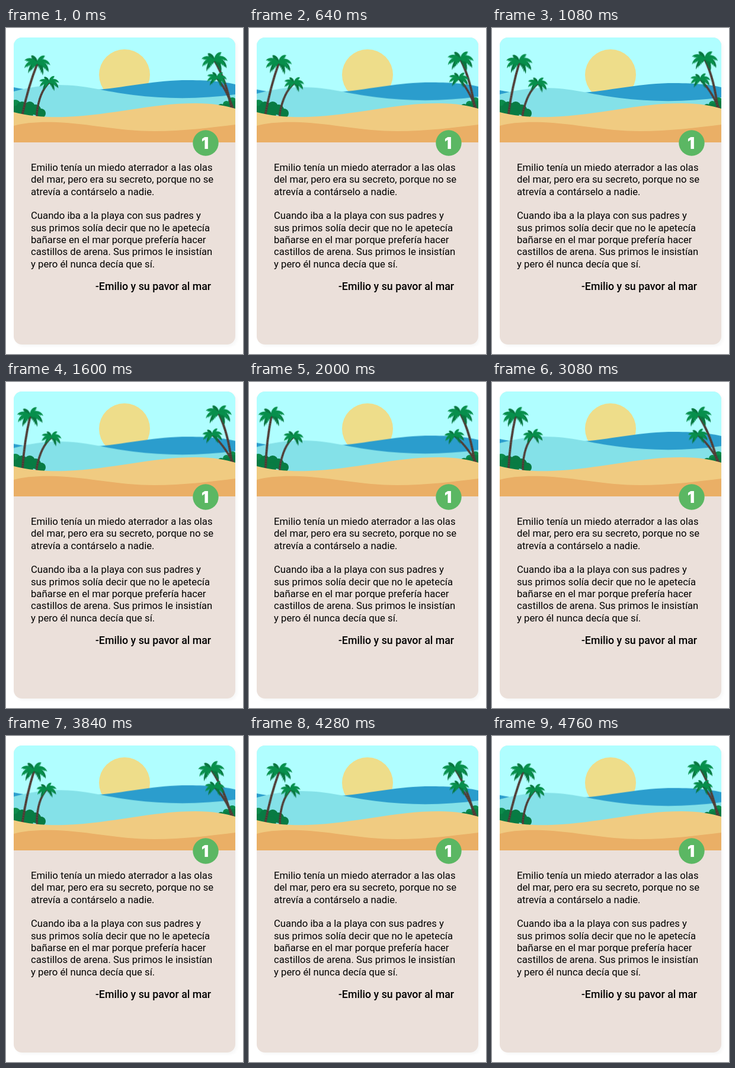
Animation, 400 px wide and 550 px high, one loop 4.8 s. Source, as an HTML page:

```html
<!DOCTYPE html>
<html lang="es">
<head>
<meta charset="utf-8">
<title>Cuento de playa</title>
<style>
  html, body { margin: 0; width: 100%; height: 100%; overflow: hidden; background: #fff; }
  svg { display: block; width: 400px; height: 550px; }
  text { font-family: Roboto, sans-serif; fill: #000; }
  .story { font-size: 16.7px; }
  .sign { font-size: 17.8px; font-weight: 500; }
  .num { font: 900 27.5px Inter, sans-serif; fill: #fff; text-anchor: middle; }
  .card { filter: drop-shadow(3px 3px 2px rgba(0, 0, 0, .03)); }
  .sway, .swell { animation: sway 2400ms cubic-bezier(.37, 0, .63, 1) infinite alternate; }
  .swell { animation-name: swell; animation-delay: -3600ms; }
  @keyframes sway { from { transform: rotate(var(--a)); } to { transform: rotate(calc(-1 * var(--a))); } }
  @keyframes swell { from { transform: translateY(5px); } to { transform: translateY(-5px); } }
</style>
</head>
<body>
<svg viewBox="0 0 400 550">
  <defs>
    <clipPath id="top"><path d="M13 193V30a14 14 0 0 1 14-14H373a14 14 0 0 1 14 14V193Z"/></clipPath>
  </defs>
  <rect class="card" x="13" y="16" width="374" height="518" rx="14" fill="#ebe0da"/>
  <g clip-path="url(#top)">
    <path fill="#b0feff" d="M13 16H387V193H13Z"/>
    <circle cx="200" cy="79" r="43" fill="#eedd8a"/>
    <g class="swell">
      <path fill="#2b9dcd" d="M13 100C55 109 105 109 155 104C210 99 250 88 308 88C345 88 370 91 387 95V170H13Z"/>
      <path fill="#84e1e8" d="M13 107C40 100 62 96 88 96C135 96 165 107 215 113C270 120 330 120 387 112V180H13Z"/>
    </g>
    <g id="palms"></g>
    <path fill="#f0cb81" d="M13 142C40 149 70 151 100 150C180 147 245 127 320 127C350 127 370 131 387 136V193H13Z"/>
    <path fill="#eaaf66" d="M13 165C30 160 55 158 85 159C140 161 190 174 250 174C300 174 345 168 387 163V193H13Z"/>
  </g>
  <circle cx="337" cy="194" r="21.7" fill="#5bb763"/>
  <text class="num" x="336" y="204">1</text>
  <g id="story"></g>
  <text class="sign" x="151" y="442">-Emilio y su pavor al mar</text>
</svg>
<script>
const lines = [
  'Emilio tenía un miedo aterrador a las olas',
  'del mar, pero era su secreto, porque no se',
  'atrevía a contárselo a nadie.',
  '',
  'Cuando iba a la playa con sus padres y',
  'sus primos solía decir que no le apetecía',
  'bañarse en el mar porque prefería hacer',
  'castillos de arena. Sus primos le insistían',
  'y pero él nunca decía que sí.'
];
story.innerHTML = lines.map((s, i) =>
  `<text class="story" x="42" y="${240.8 + i * 20.36}">${s}</text>`).join('');

// Leaf along a bent spine, with teeth on the lower edge
function frond(cx, cy, tx, ty, fill) {
  const n = 7, up = [], down = [];
  const at = t => [2 * t * (1 - t) * cx + t * t * tx, 2 * t * (1 - t) * cy + t * t * ty];
  const side = (t, w) => {
    const [x, y] = at(t);
    const dx = (1 - 2 * t) * cx + t * tx, dy = (1 - 2 * t) * cy + t * ty;
    const l = Math.hypot(dx, dy) || 1;
    return [x - dy / l * w, y + dx / l * w].map(v => v.toFixed(1)).join(' ');
  };
  const dir = Math.sign(tx) || 1;
  for (let i = 1; i < n; i++) {
    const t = i / n, w = 1.5 + 4 * Math.sin(Math.PI * t ** .8);
    up.push(side(t, -dir * w * .5));
    down.unshift(side(t - .05, dir * w * .5), side(t + .06, dir * w));
  }
  return `<path fill="${fill}" d="M0 0L${up.join('L')}L${tx} ${ty}L${down.join('L')}Z"/>`;
}

const dark = '#08763f', green = '#078f4c';
const crown = [
  [-9, -2, -14, 18, dark], [8, -1, 11, 19, dark], [15, -4, 20, 13, dark],
  [-6, -11, -12, -12, dark], [4, -12, 12, -14, green],
  [-13, -9, -22, -3, green], [-14, -5, -21, 10, green],
  [12, -11, 22, 1, green], [9, -7, 18, 11, green], [-5, -6, -9, 12, green]
].map(a => frond(...a)).join('');

function palm({ base: [bx, by], bend, head: [hx, hy], size, sway, delay }) {
  const d = `M${bx} ${by + 10}L${bx} ${by}Q${bend} ${hx} ${hy}`;
  return `<g class="sway" style="--a:${sway}deg;transform-origin:${bx}px ${by}px;animation-delay:${delay}ms">
    <path d="${d}" fill="none" stroke="#4c3b35" stroke-width="${2.8 + size}"/>
    <path d="${d}" fill="none" stroke="#604a42" stroke-width="${1.6 + size}" stroke-dasharray="1 3"/>
    <g transform="translate(${hx} ${hy}) scale(${size})">${crown}</g></g>`;
}

const bush = (fill, ...dots) =>
  dots.map(([x, y, r]) => `<circle cx="${x}" cy="${y}" r="${r}" fill="${fill}"/>`).join('');

palms.innerHTML =
  bush('#0a8a4a', [16, 130, 9], [382, 124, 7], [372, 129, 6]) +
  bush('#087b43', [27, 133, 9], [40, 133, 9], [50, 138, 9], [59, 144, 8], [18, 144, 13], [36, 145, 10],
    [384, 132, 9], [373, 135, 8], [363, 134, 6]) +
  palm({ base: [28, 144], bend: '33 100', head: [45, 58], size: 1, sway: 5.3, delay: 0 }) +
  palm({ base: [52, 144], bend: '56 108', head: [73, 92], size: .76, sway: 5, delay: -3600 }) +
  palm({ base: [381, 137], bend: '372 88', head: [353, 55], size: 1, sway: 4.5, delay: -3500 }) +
  palm({ base: [383, 135], bend: '367 102', head: [351, 88], size: .76, sway: 6, delay: 0 });
</script>
</body>
</html>
```
